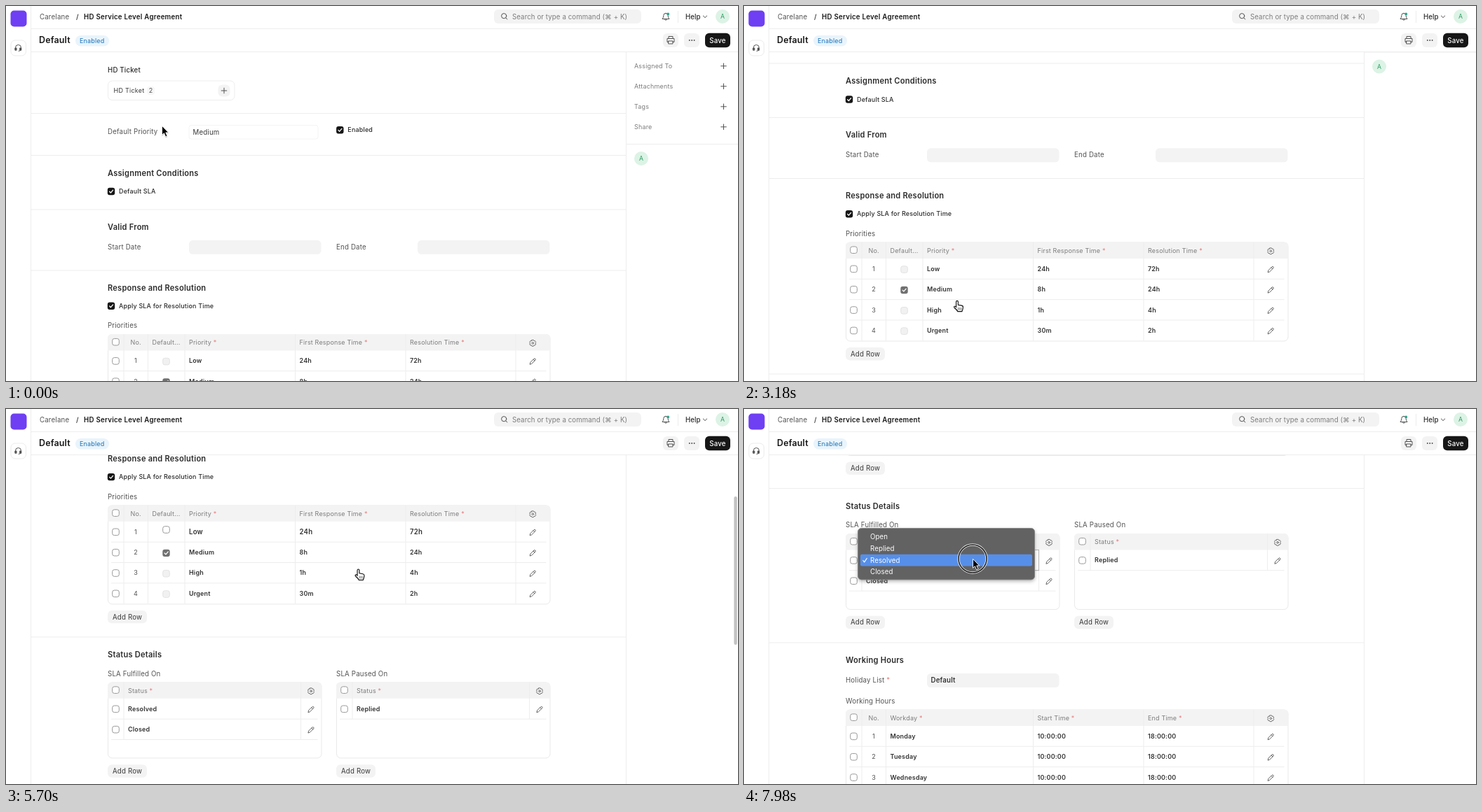
These frames come from a looping animation (1044 by 536 pixels, 8 s). An HTML page:

```html
<!DOCTYPE html>
<html lang="en">
<head>
<meta charset="utf-8">
<title>Service level agreement</title>
<style>
html, body { margin: 0; width: 100%; height: 100%; overflow: hidden; background: #fff; }
svg { display: block; }
text { font: 400 9.667px Inter, sans-serif; letter-spacing: .02em; fill: #525252; white-space: pre; }
.s { font-size: 8.98px; }
.h { font-size: 11.05px; font-weight: 600; letter-spacing: .023em; fill: #2b2b2b; }
.b { font-weight: 600; fill: #333; }
.m { font-weight: 500; fill: #2b2b2b; }
.d { fill: #383838; }
.g { fill: #7c7c7c; }
.c { text-anchor: middle; }
.n { letter-spacing: .028em; }
.k { fill: #171717; }
.z { letter-spacing: .01em; }
.title { font-size: 12.43px; font-weight: 600; letter-spacing: .015em; fill: #171717; }
.req { fill: #e58080; }
.green { fill: #2f9c66; font-size: 8.7px; }
.blue { fill: #1a72b8; }
.white { fill: #fff; }
.line { stroke: #ededed; fill: none; }
.icon { stroke: #525252; fill: none; stroke-linecap: round; stroke-linejoin: round; }
</style>
</head>
<body>
<svg id="stage" width="1044" height="536"></svg>
<script>
const GREY = '#f3f3f3';

const text = (x, y, s, cls = '') => `<text x="${x}" y="${y}" dy=".36em" class="${cls}">${s}</text>`;
const need = s => s + '<tspan class="req"> *</tspan>';
const box = (x, y, w, h, r, fill, stroke = 'none') =>
  `<rect x="${x}" y="${y}" width="${w}" height="${h}" rx="${r}" fill="${fill}" stroke="${stroke}"/>`;
const path = (d, cls = 'icon', more = '') => `<path d="${d}" class="${cls}" ${more}/>`;
const at = (x, y, s) => `<g transform="translate(${x} ${y})">${s}</g>`;
const hline = (y, x1 = 36, x2 = 884.5) => path(`M${x1} ${y}H${x2}`, 'line');
const layer = (id, s) => `<g id="${id}">${s}</g>`;

const plus = (x, y) => path(`M${x - 3.8} ${y}h7.6M${x} ${y - 3.8}v7.6`);
const tick = (x, y, fill) => box(x - 5.2, y - 5.2, 10.4, 10.4, 3, fill) +
  path(`M${x - 2.4} ${y + .2}l1.8 1.8 3.2-3.8`, 'icon', 'style="stroke:#fff;stroke-width:1.3"');
const empty = (x, y) => box(x - 4.8, y - 4.8, 9.6, 9.6, 2.8, '#fff', '#999');
const locked = (x, y) => box(x - 4.8, y - 4.8, 9.6, 9.6, 2.8, '#f1f1f1', '#e3e3e3');
const gear = (x, y) => at(x, y, path('M-1.2-4.1h2.4l.6 1.3 1.5-.1 1.2 2-.9 1.2.9 1.2-1.2 2-1.5-.1-.6 1.3h-2.4l-.6-1.3-1.5.1-1.2-2 .9-1.2-.9-1.2 1.2-2 1.5.1z',
  'icon', 'stroke-width=".8"') + '<circle cy=".3" r="1.3" class="icon" stroke-width=".8"/>');
const pencil = (x, y) => at(x, y, path('M-4 4l.7-2.6 5-5q1-.9 1.9 0t0 1.9l-5 5zM.8-2.6l1.9 1.9', 'icon', 'stroke-width=".9"'));
const avatar = (x, y) => `<circle cx="${x}" cy="${y}" r="10" fill="#dcf3e5"/>` + text(x, y, 'A', 'c green');
const button = (x, y) => box(x, y - 9.2, 56, 18.4, 6, GREY) + text(x + 28, y, 'Add Row', 'c d');
const field = (x, y) => box(x, y - 10, 188.5, 20, 5.5, GREY);
const option = (x, y, label) => tick(x, y, '#171717') + text(x + 11, y, label, 's m');

const ROW = 29.35, HEAD = 23.4;
// cols: column edges; heads: [x, markup]; count: number of rows
function grid(top, cols, heads, count, height) {
  const x0 = cols[0], x1 = cols[cols.length - 1], tool = (cols[cols.length - 2] + x1) / 2;
  const body = top + HEAD, end = body + count * ROW;
  let s = box(x0 + .5, top + .5, x1 - x0, height, 6, '#fff', '#e9e9e9') +
    path(`M${x0} ${body}V${top + 6}q0-6 6-6H${x1 - 5}q6 0 6 6V${body}z`, '', `fill="${GREY}"`);
  for (const x of cols.slice(1, -1)) s += path(`M${x} ${top}V${end}`, 'line');
  s += empty(x0 + 11.5, top + 11.2) + gear(tool, top + 12.5);
  for (const [x, label] of heads) s += text(x, top + 12, label, 's g');
  for (let i = 0; i < count; i++) {
    const y = body + ROW * (i + .5), low = y + ROW / 2;
    s += empty(x0 + 11.5, y + .3) + pencil(tool, y + .8);
    if (low < top + height - 1) s += hline(low, x0 + 5, x1 - 5);
  }
  return s;
}
const cells = (y, list, cls = 's b') => list.map(([x, s]) => text(x, y, s, cls)).join('');

function priorities() {
  const top = 469, rows = [['Low', '24h', '72h'], ['Medium', '8h', '24h'], ['High', '1h', '4h'], ['Urgent', '30m', '2h']];
  const xs = [261, 418.5, 576];
  let s = grid(top, [145, 168, 202.5, 255, 412.5, 570, 727, 775.5], [[177.5, 'No.'], [208.5, 'Default...'],
    [261, need('Priority')], [418.5, need('First Response Time')], [576, need('Resolution Time')]], 4, 141);
  rows.forEach((row, i) => {
    const y = top + HEAD + ROW * (i + .5), list = row.map((v, k) => [xs[k], v]);
    s += text(185, y, i + 1, 's c');
    if (i) s += (i === 1 ? tick(228.5, y + 1, '#707070') : locked(228.5, y + 1)) + cells(y, list);
    else s += layer('plainRow', locked(228.5, y + 1) + cells(y, list)) +
      layer('editRow', empty(228.5, y - 3) + cells(y - .4, list, 'b'));
  });
  return s;
}

function durationPicker() {
  const col = (x, label, v) => text(x, 537, label, 's') + box(x, 547, 40, 19, 5, GREY) + text(x + 5, 556.5, v);
  return box(412.5, 492.5, 157.5, 29, 0, 'none', '#b5b5b5') +
    `<g filter="url(#soft)">${box(414, 525, 104, 67, 6, '#fff', '#ededed')}</g>` +
    at(0, 3, col(422, 'Hours', 24) + col(470, 'Minutes', 0));
}

function statusGrid(x, label, names) {
  const x1 = x + 304.5, top = 722;
  return text(x, 709.6, label) + grid(top, [x, x + 23, x + 275.5, x1], [[x + 29, need('Status')]], names.length, 108) +
    names.map((n, i) => text(x + 29, top + HEAD + ROW * (i + .5), n, 's b')).join('') + button(x, 849);
}

function workdays() {
  const top = 973.5, days = ['Monday', 'Tuesday', 'Wednesday', 'Thursday'];
  return grid(top, [145, 168, 202.5, 412.5, 570, 727, 775.5], [[177.5, 'No.'], [208.5, need('Workday')],
    [418.5, need('Start Time')], [576, need('End Time')]], 4, 141) + days.map((d, i) => {
      const y = top + HEAD + ROW * (i + .5);
      return text(185, y, i + 1, 's c') + cells(y, [[208.5, d], [418.5, '10:00:00'], [576, '18:00:00']]);
    }).join('');
}

const page = [153.5, 213.5, 291, 378, 657.5, 878].map(y => hline(y)).join('') +
  text(145, 91.5, 'HD Ticket', 'm') + box(145.5, 107, 180.5, 27.5, 6, '#fff', '#ededed') +
  text(153.5, 121, 'HD Ticket', 's d n') + box(201, 115, 11, 12, 4, '#f7f7f7') + text(206.5, 121, '2', 's c') +
  box(302.5, 112.5, 17, 17, 6, GREY) + plus(311, 121) +
  text(145, 180, 'Default Priority') + box(261, 170.5, 184, 19.5, 3, '#fff', '#f4f4f4') +
  text(266.5, 180.5, 'Medium', 'd') + option(476.3, 177.2, 'Enabled') +
  text(145, 238.7, 'Assignment Conditions', 'h') + option(150, 265, 'Default SLA') +
  text(145, 315.7, 'Valid From', 'h') + text(145, 344.5, 'Start Date') + field(261, 344.8) +
  text(471, 344.5, 'End Date') + field(587, 344.8) +
  text(145, 402.7, 'Response and Resolution', 'h') + option(150, 428.7, 'Apply SLA for Resolution Time') +
  text(145, 457, 'Priorities') + priorities() + button(145, 628.7) +
  text(145, 682.9, 'Status Details', 'h') + statusGrid(145, 'SLA Fulfilled On', ['Resolved', 'Closed']) +
  statusGrid(471, 'SLA Paused On', ['Replied']) +
  layer('editStatus', box(168, 745.4, 252.5, 29.3, 0, 'none', '#b0b0b0')) +
  text(145, 903.2, 'Working Hours', 'h') + text(145, 932, need('Holiday List')) + field(261, 932) +
  text(266.5, 932, 'Default', 'b') + text(145, 961.5, 'Working Hours') + workdays() +
  ['Assigned To', 'Attachments', 'Tags', 'Share'].map((s, i) =>
    text(896, 86 + 29 * i, s, 's g') + plus(1023.5, 85.8 + 29 * i)).join('') +
  hline(197.5, 885, 1044) + avatar(906, 218) + layer('picker', durationPicker());

const header = box(0, 0, 1044, 65.5, 0, '#fff') + box(0, 65, 35, 471, 0, '#fff') +
  path('M35.5 0V536M36 32.5H1044M36 65.5H1044M958.5 7V24', 'line') +
  box(6.5, 6.5, 23, 23, 5, '#6e3ff3') + box(7, 49, 21.5, 22, 6, '#fff', '#ebebeb') +
  at(17.5, 60, path('M-4 1.5V-.5a4 4 0 0 1 8 0v2M4 1.5q0 3-3.4 3') +
    path('M-4.3 0h1.8v3.2h-1.8zM2.5 0h1.8v3.2H2.5z', 'icon', 'style="fill:#525252"')) +
  text(48, 15.2, 'Carelane') + text(100, 15.2, '/', 'm') + text(111, 15.2, 'HD Service Level Agreement', 'b n k') +
  box(696, 5, 210, 20, 6, GREY) + '<circle cx="710.2" cy="14.2" r="3.6" class="icon"/>' + path('M712.9 17l2 2') +
  text(722, 15.2, 'Search or type a command (⌘ + K)', 'g z') +
  path('M936.3 18.2q1.6-1.6 1.6-4.8a3.1 3.1 0 0 1 6.2 0q0 3.2 1.6 4.8zM939.6 19.8q1.4 1 2.8 0') +
  '<circle cx="944.2" cy="11.4" r="1.9" fill="#2ba58a"/>' +
  text(969, 15.2, 'Help', 'm z') + path('M994.3 14l2.7 2.6 2.7-2.6') + avatar(1022, 15) +
  text(47, 49, 'Default', 'title') + box(99, 42, 48, 15.5, 7.7, '#e9f4fb') + text(105, 49.9, 'Enabled', 's blue') +
  box(937, 39, 22, 20, 6, GREY) + box(967, 39, 22, 20, 6, GREY) + box(997, 38.8, 36, 20.4, 6, '#171717') +
  path('M945 46.5v-3h6v3M945 51.5h-2v-5h10v5h-2M945 50h6v4h-6z') +
  [974.8, 978.2, 981.6].map(x => `<circle cx="${x}" cy="49" r=".9" fill="#444"/>`).join('') +
  text(1015, 49.1, 'Save', 'c m white');

const menu = `<g filter="url(#soft)">${box(162.5, 170.5, 252, 73.5, 5, '#626262', '#868686')}</g>` +
  box(166, 207.8, 245, 16.6, 2, '#568fe9') +
  ['Open', 'Replied', 'Resolved', 'Closed'].map((s, i) => text(180, 183 + 16.6 * i, s, 'white z')).join('') +
  path('M169.8 216.5l1.8 2.3 3.6-5.3', 'icon', 'style="stroke:#fff;stroke-width:1.2"');

const pointer = '<circle id="halo" r="20" fill="none" stroke="#fff" stroke-width="3.4" opacity=".8"/>' +
  '<circle id="ring" r="20" fill="none" stroke="#1c1c1c" stroke-width="1.5"/>' +
  '<g filter="url(#drop)">' +
  path('M.5.3V13.3L3.4 10.7 5.7 15.8 8 14.8 5.8 9.9H9.7Z', '', 'id="arrow" stroke="#fff" stroke-width=".9"') +
  layer('hand', path('M-1.9 8V.4a1.4 1.4 0 0 1 2.8 0V4.9L6 5.8q2.2.5 1.9 2.6l-.6 3.2-1 2.6H.4Q-.7 11.8-4 9.2q-1.6-1.6-.3-2.2 1.2-.4 2.4 1z',
    '', 'fill="#fff" stroke="#111" stroke-width="1.1"') + path('M1.2 9v3M3.2 9v3M5.2 9v3', 'icon', 'stroke-width=".8"')) + '</g>';

document.getElementById('stage').innerHTML =
  `<defs><filter id="soft"><feDropShadow dx="0" dy="2" stdDeviation="2.5" flood-opacity=".28"/></filter>
  <filter id="drop" x="-50%" y="-50%" width="200%" height="200%"><feDropShadow dx="0" dy=".7" stdDeviation=".7" flood-opacity=".35"/></filter></defs>` +
  path('M884.5 65V536', 'line') + layer('page', page) + header + layer('menu', menu) +
  `<rect id="bar" x="1038.3" width="4.4" height="212" rx="2.2" fill="#c2c2c2"/>` + layer('pointer', pointer);

const el = {};
for (const node of document.querySelectorAll('[id]')) el[node.id] = node;

// [ms, scroll offset]
const SCROLL = [[1410, 0], [1440, 1.5], [1500, 15], [1680, 68], [1740, 75], [1950, 75], [2000, 82], [2220, 126.5],
  [2250, 131.5], [3510, 131.5], [3540, 139], [3870, 210.5], [3960, 224.5], [5370, 224.5], [5460, 238],
  [5800, 370], [5950, 407], [6060, 414.5], [6510, 414.5], [6580, 440], [6720, 532], [6780, 544]];
// [ms, x, y]
const MOVES = [[210, 222, 171], [400, 328, 161], [570, 320, 181], [870, 320, 181], [1200, 220, 275], [2400, 220, 275],
  [2580, 314, 208], [2730, 314, 208], [2940, 262, 340], [3150, 300, 426], [3510, 513, 252], [4110, 513, 252],
  [4350, 476, 284], [4740, 476, 284], [4950, 503, 230], [6060, 503, 230], [6180, 437, 239],
  [6930, 437, 239], [7140, 326, 214]];
const CLICKS = [4380, 4950, 6210, 7170, 7530, 7980];
const HANDS = [[2990, 3290], [4260, 4440], [5520, 6075], [7080, 7200]];
const BARS = [[1470, 2730], [3540, 4440], [5400, 7260]];

const linear = p => p, smooth = p => p * p * (3 - 2 * p);
function track(keys, t, ease) {
  const i = keys.findIndex(k => k[0] > t);
  if (i <= 0) return keys[i < 0 ? keys.length - 1 : 0].slice(1);
  const a = keys[i - 1], b = keys[i], p = ease((t - a[0]) / (b[0] - a[0]));
  return a.slice(1).map((v, k) => v + (b[k + 1] - v) * p);
}
const during = (t, spans) => spans.some(([a, b]) => t >= a && t < b);
const show = (id, on) => el[id].setAttribute('visibility', on ? 'visible' : 'hidden');
const move = (id, x, y) => el[id].setAttribute('transform', `translate(${x} ${y})`);

function draw(t) {
  const [scroll] = track(SCROLL, t, linear), [x, y] = track(MOVES, t, smooth);
  move('page', 0, -scroll);
  move('pointer', x, y);
  move('bar', 0, scroll * .38 - 1);
  el.bar.setAttribute('opacity', Math.max(0, ...BARS.map(([a, b]) => t < a ? 0 : Math.min(1, 1 - (t - b) / 120))));

  const editing = t >= 4440, hand = during(t, HANDS), click = during(t, CLICKS.map(c => [c, c + 120]));
  show('plainRow', !editing);
  show('editRow', editing);
  show('picker', during(t, [[4440, 5010]]));
  show('editStatus', t >= 7200);
  show('menu', t >= 7560);
  show('hand', hand);
  show('arrow', !hand);
  show('halo', click);
  show('ring', click);
}

const start = performance.now();
function frame() {
  draw((performance.now() - start) % 8000);
  requestAnimationFrame(frame);
}
frame();
</script>
</body>
</html>
```
